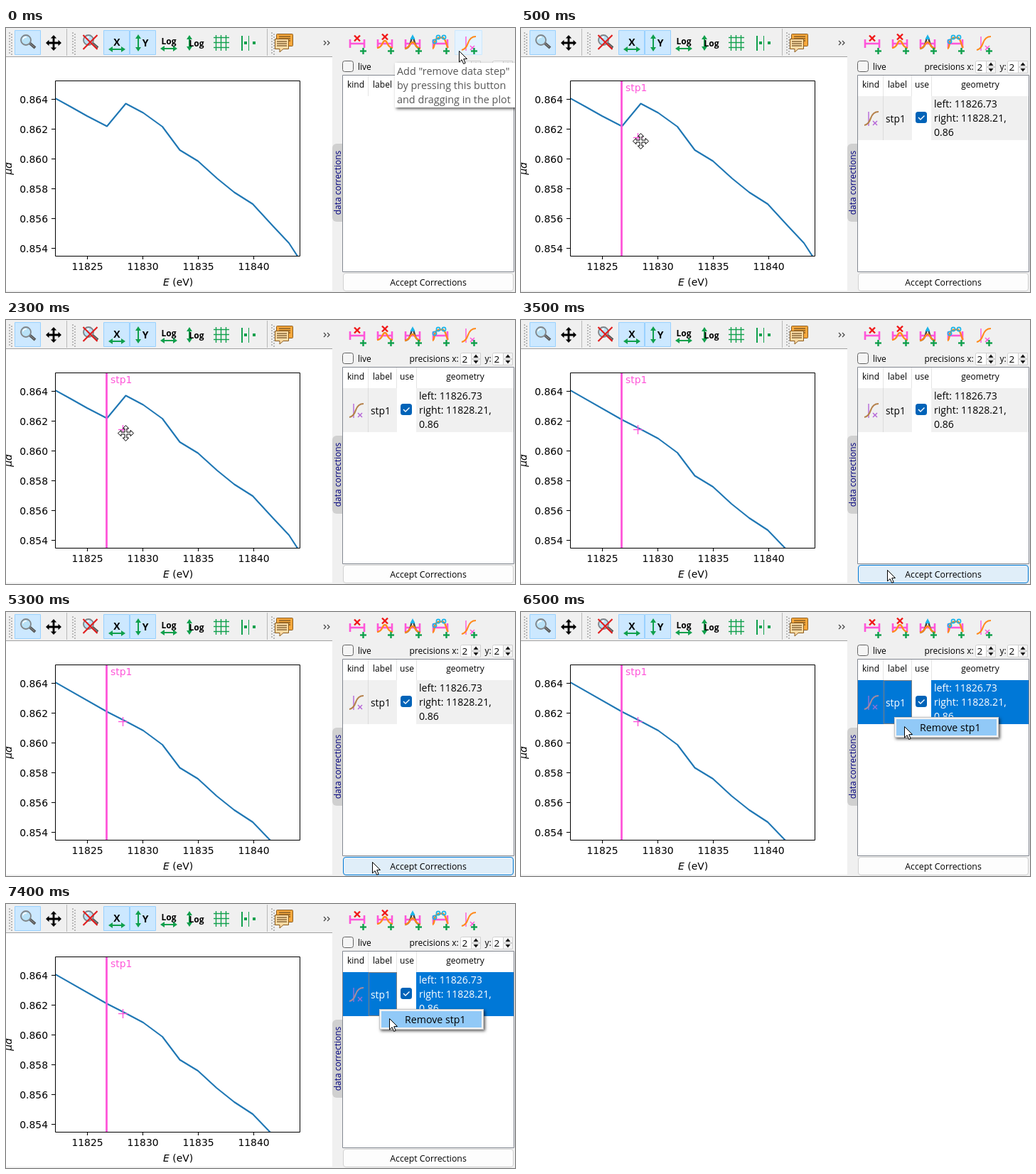
Animation, 716 px wide and 372 px high, one loop 8 s. Source, as an HTML page with a canvas:

```html
<!DOCTYPE html>
<html lang="en">
<head>
<meta charset="utf-8">
<title>Data step correction</title>
<style>
  html, body { margin: 0; width: 100%; height: 100%; overflow: hidden; background: #f0f0f0; }
  canvas { display: block; }
</style>
</head>
<body>
<canvas id="stage" width="716" height="372"></canvas>
<script>
const ctx = document.getElementById('stage').getContext('2d');
const UI = '"Open Sans", "Noto Sans", sans-serif';
const PLOT = '"DejaVu Sans", sans-serif';
const MAGENTA = '#ff55d9', GREEN = '#10a04c', ORANGE = '#ff8a1c', RED = '#f01818', SKY = '#19b5ea';

const LOOP = 8000;
const STEP_ADDED = 500, ACCEPTED = 3500, MENU_OPEN = 6500;

const RAW = [[69, 98.8], [91, 111], [114, 124], [142, 138.5], [168.5, 106.5], [193, 119.5], [220, 139],
  [244.5, 172], [270, 187.5], [297, 212], [321, 231.5], [347, 248], [375, 278.5], [398, 303], [411, 323]];
const CORRECTED = [[69, 98.8], [142, 140.5], [168.5, 154], [193, 167], [220, 187], [244.5, 219.5],
  [270, 235], [296, 259], [321, 279], [347, 296], [373, 323]];

function rect(x, y, w, h, fill, stroke, radius = 0) {
  ctx.beginPath();
  ctx.roundRect(x, y, w, h, radius);
  if (fill) { ctx.fillStyle = fill; ctx.fill(); }
  if (stroke) { ctx.strokeStyle = stroke; ctx.lineWidth = 1; ctx.stroke(); }
}

function line(points, color, width = 1) {
  ctx.beginPath();
  points.forEach(([x, y]) => ctx.lineTo(x, y));
  ctx.strokeStyle = color;
  ctx.lineWidth = width;
  ctx.stroke();
}

function curve(path, color, width) {
  ctx.strokeStyle = color;
  ctx.lineWidth = width;
  ctx.stroke(new Path2D(path));
}

function polygon(points, fill, stroke) {
  ctx.beginPath();
  points.forEach(([x, y]) => ctx.lineTo(x, y));
  ctx.closePath();
  ctx.fillStyle = fill;
  ctx.fill();
  if (stroke) { ctx.strokeStyle = stroke; ctx.lineWidth = 1; ctx.stroke(); }
}

function text(str, x, y, { size = 12, color = '#000', align = 'left', family = UI, style = '' } = {}) {
  ctx.font = `${style} ${size}px ${family}`;
  ctx.textAlign = align;
  ctx.fillStyle = color;
  ctx.fillText(str, x, y);
}

function at(x, y, draw, angle = 0) {
  ctx.save();
  ctx.translate(x, y);
  ctx.rotate(angle);
  draw();
  ctx.restore();
}

function disc(x, y, r, fill, stroke, width = 1) {
  ctx.beginPath();
  ctx.arc(x, y, r, 0, Math.PI * 2);
  if (fill) { ctx.fillStyle = fill; ctx.fill(); }
  if (stroke) { ctx.strokeStyle = stroke; ctx.lineWidth = width; ctx.stroke(); }
}

function cross(x, y, r, color, width) {
  line([[x - r, y - r], [x + r, y + r]], color, width);
  line([[x + r, y - r], [x - r, y + r]], color, width);
}

function plus(x, y, r, color, width) {
  line([[x - r, y], [x + r, y]], color, width);
  line([[x, y - r], [x, y + r]], color, width);
}

function fourArrows(x, y, fill, stroke) {
  const arm = [[-1.4, -1.4], [-1.4, -6.5], [-4.2, -6.5], [0, -11], [4.2, -6.5], [1.4, -6.5]];
  const points = [];
  for (let i = 0, c = 1, s = 0; i < 4; i++, [c, s] = [-s, c]) {
    arm.forEach(([px, py]) => points.push([x + px * c - py * s, y + px * s + py * c]));
  }
  polygon(points, fill, stroke);
}

function doubleArrow(x, y, half, angle = 0) {
  at(x, y, () => {
    line([[-half + 3, 0], [half - 3, 0]], GREEN, 2);
    for (const side of [-1, 1]) {
      polygon([[side * half, 0], [side * (half - 6), -4], [side * (half - 6), 4]], GREEN);
    }
  }, angle);
}

function pointer(x, y) {
  const shape = [[0, 0], [0, 15.5], [3.6, 12.2], [6.2, 18], [8.7, 16.9], [6.2, 11.2], [11, 11]];
  polygon(shape.map(([px, py]) => [x + px + .5, y + py + .5]), '#fff', '#000');
}

function magnifier(x, y) {
  line([[x + 5, y + 4], [x + 13, y + 11]], '#555', 4);
  line([[x + 6, y + 5], [x + 12, y + 10]], '#999', 1);
  disc(x, y, 7, '#b9e2f7', '#808488', 1.8);
  curve(`M${x - 4} ${y - 1}q1 -4 5 -3`, '#fff', 1.5);
}

function gripper(x) {
  for (let y = 6; y < 37; y += 4) {
    rect(x, y, 2, 2, '#b8b8b8');
    rect(x + 3, y + 2, 2, 2, '#b8b8b8');
  }
}

function notes() {
  rect(380.5, 8.5, 23, 17, '#f7a83c', '#8a5a1c', 1);
  for (const y of [12, 15, 18]) line([[384, y], [400, y]], '#6b4b20', 1.2);
  polygon([[378.5, 15.5], [397.5, 15.5], [397.5, 29.5], [390, 29.5], [385, 34], [385, 29.5], [378.5, 29.5]],
    '#fbdba4', '#8a5a1c');
  for (const y of [19, 22, 25]) line([[381, y], [395, y]], '#6b4b20', 1.2);
}

function toolbar() {
  rect(0, 0, 459, 40, '#f0f0f0');
  rect(0, 40, 459, 1, '#a0a0a0');
  [4, 93, 373].forEach(gripper);
  [85, 367].forEach(x => rect(x, 1, 1, 38, '#b8b8b8'));
  [12, 137, 174].forEach(x => rect(x + .5, 3.5, 36, 34, '#cce8ff', '#99d1ff'));

  magnifier(28, 17);
  fourArrows(67, 21, '#000');
  magnifier(116, 17);
  cross(118.5, 20, 10, '#e01c1c', 2.2);

  const bold = { style: 'bold', align: 'center' };
  text('X', 156, 25, { ...bold, size: 14 });
  doubleArrow(156, 30, 12);
  doubleArrow(186, 21, 12, Math.PI / 2);
  text('Y', 196, 26, { ...bold, size: 14 });
  text('Log', 229, 23, bold);
  doubleArrow(229, 29, 12);
  doubleArrow(258, 21, 11, Math.PI / 2);
  text('Log', 268, 26, bold);

  for (const d of [-7, 0, 7]) {
    line([[302.5 + d, 10], [302.5 + d, 32]], GREEN, 1.4);
    line([[292, 20.5 + d], [314, 20.5 + d]], GREEN, 1.4);
  }
  line([[332, 11], [332, 32]], GREEN, 2);
  line([[341.5, 11], [341.5, 32]], GREEN, 1);
  rect(335, 19, 4, 4, GREEN);
  rect(347, 19, 4, 4, GREEN);
  notes();

  for (const x of [447, 452]) line([[x, 18], [x + 3, 21], [x, 24]], '#444', 1.2);
}

function plot(t) {
  rect(0, 41, 459, 329, '#fff');
  const label = { size: 13.9, family: PLOT };
  for (let i = 0; i < 4; i++) {
    const x = 114.5 + i * 78;
    line([[x, 321], [x, 326]], '#000', 1.1);
    text(String(11825 + 5 * i), x, 341, { ...label, align: 'center' });
  }
  for (let i = 0; i < 6; i++) {
    const y = 100.5 + i * 42;
    line([[64, y], [69, y]], '#000', 1.1);
    text((0.864 - i * 0.002).toFixed(3), 59, y + 5.5, { ...label, align: 'right' });
  }
  text('E', 221, 363, { ...label, style: 'italic' });
  text(' (eV)', 229.8, 363, label);
  at(7.5, 198, () => text('μd', 0, 0, { ...label, style: 'italic', align: 'center' }), -Math.PI / 2);

  ctx.save();
  ctx.beginPath();
  ctx.rect(69, 74, 344, 247);
  ctx.clip();
  ctx.lineJoin = 'round';
  line(t < ACCEPTED ? RAW : CORRECTED, '#1f77b4', 2.1);
  if (t >= STEP_ADDED) {
    line([[141.5, 74], [141.5, 321]], MAGENTA, 2.8);
    text('stp1', 147, 89, { ...label, color: MAGENTA });
    plus(164.5, 154.5, 6.5, MAGENTA, 1.4);
  }
  ctx.restore();
  rect(69.5, 74.5, 344, 247, null, '#000');
  if (t >= STEP_ADDED && t < ACCEPTED) fourArrows(168.5, 159.5, '#fff', '#000');
}

function sideTab() {
  rect(459, 163, 14, 110, '#d0d0d0', null, [6, 0, 0, 6]);
  at(471, 218, () => text('data corrections', 0, 0, { color: '#00007f', align: 'center' }), -Math.PI / 2);
}

function span(x) {
  line([[x - 11, 22], [x + 11, 22]], MAGENTA, 2.6);
  for (const d of [-10, 10]) line([[x + d, 16], [x + d, 28]], MAGENTA, 2.6);
}

function stepCurve(x, y, color, mark) {
  line([[x - 4, y - 9], [x - 4, y + 11]], mark, 1.4);
  at(x, y, () => curve('M-10 10Q-4 9 -1 0T10 -9', color, 2.2));
  cross(x + 5, y + 7, 3, mark, 1.4);
}

function correctionIcons(t) {
  if (t < STEP_ADDED) rect(631.5, 3.5, 38, 34, '#e5f3ff', '#cce8ff');
  [494, 533, 572, 611].forEach(span);
  cross(494, 14.5, 4, RED, 2.4);

  curve('M522 28C530 28 529 18 533 18S536 28 544 28', ORANGE, 2.4);
  cross(533, 12.5, 4, RED, 2.4);

  curve('M561 29C571 28 569 13 572 13S573 28 583 29', '#444', 2.4);
  curve('M561 29C569 28 568 20 572 20S575 28 583 29', ORANGE, 2.4);
  polygon([[572, 9], [575.5, 16], [568.5, 16]], SKY);

  curve('M600 29C604 28 601 15 608 14S616 13 618 18S620 26 622 28', ORANGE, 2.4);
  for (const [x, y] of [[603, 19], [608, 13], [616, 13]]) disc(x, y, 2.6, null, SKY, 1.6);

  stepCurve(651, 21, ORANGE, MAGENTA);
  for (let i = 0; i < 5; i++) plus(502.5 + 39 * i, 32.5, 4.5, GREEN, 2.4);
}

function spinBox(x) {
  rect(x + .5, 46.5, 28, 17, '#fff', '#d0d0d0', 2);
  text('2', x + 2.5, 59.5, { size: 13.5 });
  rect(x + 15.5, 46.5, 13, 8, '#f4f4f4', '#cfcfcf');
  rect(x + 15.5, 55.5, 13, 8, '#f4f4f4', '#cfcfcf');
  polygon([[x + 22, 48.5], [x + 25.5, 53], [x + 18.5, 53]], '#111');
  polygon([[x + 22, 61.5], [x + 25.5, 57], [x + 18.5, 57]], '#111');
}

function stepRow(selected) {
  const fill = selected ? '#0078d7' : '#f0f0f0';
  const color = selected ? '#fff' : '#000';
  rect(474, 96, 240, 62, fill);
  rect(550, 96, 27, 62, '#fff');
  if (!selected) line([[509.5, 96], [509.5, 158]], '#dcdcdc');
  stepCurve(493, 127, selected ? '#a58aa0' : '#b5824c', selected ? '#9270d4' : '#b565d8');
  text('stp1', 513, 133, { size: 13.8, color });
  rect(555, 118, 16, 16, '#0063b8', null, 3.5);
  line([[559, 126], [562, 129], [567.5, 123.5]], '#fff', 1.4);
  ['left: 11826.73', 'right: 11828.21,', '0.86'].forEach((row, i) =>
    text(row, 581, 112 + 20 * i, { size: 14.1, color }));
  if (selected) {
    ctx.setLineDash([1, 1]);
    rect(510.5, 96.5, 39, 61, null, '#ff8728');
    ctx.setLineDash([]);
  }
}

function panel(t) {
  correctionIcons(t);
  rect(473.5, 46.5, 15, 15, '#f5f5f5', '#626262', 3);
  text('live', 495, 59);
  text('precisions x:', 567.5, 59);
  spinBox(639);
  text('y:', 673.5, 59);
  spinBox(684);

  rect(473.5, 66.5, 241, 277, '#fff', '#828790');
  [509.5, 549.5, 577.5].forEach(x => line([[x, 67], [x, 96]], '#e5e5e5'));
  [['kind', 492], ['label', 529.5], ['use', 564], ['geometry', 646]].forEach(([name, x]) =>
    text(name, x, 84, { align: 'center' }));
  if (t >= STEP_ADDED) stepRow(t >= MENU_OPEN);

  const hover = t >= ACCEPTED && t < MENU_OPEN;
  rect(474.5, 345.5, 239, 25, hover ? '#e0eef9' : '#fdfdfd', hover ? '#0078d4' : '#d0d0d0', 3.5);
  text('Accept Corrections', 594, 363, { size: 12.3, align: 'center' });
}

function withShadow(draw) {
  ctx.save();
  ctx.shadowColor = 'rgba(0,0,0,.65)';
  ctx.shadowBlur = 4;
  ctx.shadowOffsetX = ctx.shadowOffsetY = 2;
  draw();
  ctx.restore();
}

function tooltip() {
  withShadow(() => rect(547, 49, 169, 63, '#fff'));
  ['Add "remove data step"', 'by pressing this button', 'and dragging in the plot'].forEach((row, i) =>
    text(row, 550, 66 + 20 * i, { size: 14.4, color: '#575757' }));
}

function contextMenu() {
  withShadow(() => rect(525, 148, 147, 29, '#f2f2f2'));
  rect(525.5, 148.5, 146, 28, null, '#c8c8c8');
  rect(528, 151, 141, 23, '#91c9f7');
  text('Remove stp1', 561, 168, { size: 14.2 });
}

function frame() {
  const t = performance.now() % LOOP;
  rect(0, 0, 716, 372, '#f0f0f0');
  toolbar();
  plot(t);
  sideTab();
  panel(t);
  if (t < STEP_ADDED) {
    tooltip();
    pointer(637, 32);
  } else if (t >= MENU_OPEN) {
    contextMenu();
    pointer(539, 161);
  } else if (t >= ACCEPTED) {
    pointer(515, 352);
  }
  requestAnimationFrame(frame);
}
frame();
</script>
</body>
</html>
```
